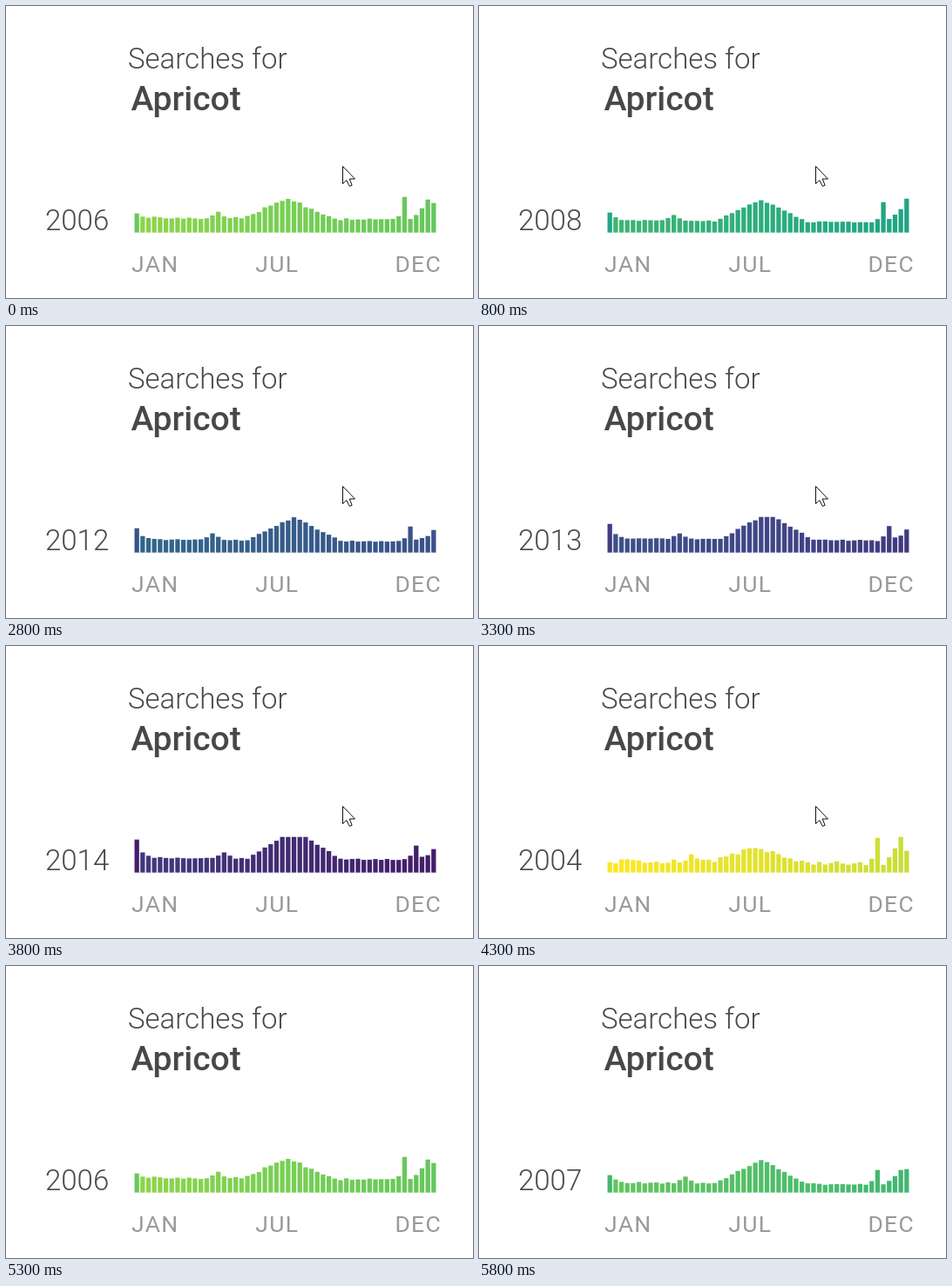
Animation of 536 by 336 pixels, one loop 6.1 s. Source, as an HTML page:

```html
<!DOCTYPE html>
<html lang="en">
<head>
<meta charset="utf-8">
<title>Seasonal searches</title>
<style>
  html, body { margin: 0; width: 100%; height: 100%; overflow: hidden; background: #fff; }
  svg { display: block; width: 536px; height: 336px; }
  text { font-family: Roboto, "Open Sans", sans-serif; }
  .light { font-size: 33px; font-weight: 300; fill: #4a4a4a; }
  .name { font-size: 39px; font-weight: 500; fill: #484848; }
  .month { font-size: 26.5px; letter-spacing: 1.3px; fill: #999; }
</style>
</head>
<body>
<svg viewBox="0 0 536 336">
  <text class="light" x="140" y="72">Searches for</text>
  <text class="name" x="143.5" y="120">Apricot</text>
  <text class="light" id="year" x="45" y="258"></text>
  <g id="bars"></g>
  <text class="month" x="144" y="306">JAN</text>
  <text class="month" x="286.3" y="306">JUL</text>
  <text class="month" x="446.4" y="306">DEC</text>
  <path id="cursor" d="M0 0V20L4.4 16L7.8 22.9L10.6 21.8L7.8 14.5H14Z"
        fill="#fff" stroke="#111"/>
</svg>
<script>
const LOOP = 6100, WEEKS = 52, BASE = 260.7, LEFT = 147.5, PITCH = 6.68, WIDTH = 5.3;
const FIRST = 2004, YEARS = 11, TALLEST = 41;

const ramp = ['#fde725', '#7ad151', '#22a884', '#2a788e', '#414487', '#440154']
  .map(hex => [1, 3, 5].map(i => parseInt(hex.slice(i, i + 2), 16)));

// Heights that shape a season: quiet weeks, New Year, summer, November sale, last two weeks.
const keys = {
  2005: [12, 12, 29, 40, 41, 25],
  2006: [16, 22, 39, 41, 38, 34],
  2007: [10.5, 20, 38, 26, 26, 27],
  2008: [13, 23, 38, 35, 27, 39],
  2010: [14.5, 18, 41, 31, 26, 41],
  2012: [14, 28, 41, 30, 19, 26],
  2014: [16, 38, 50, 31, 20, 27],
};

const lerp = (a, b, k) => a + (b - a) * k;

// Years without a key lie halfway between their neighbours.
function keyOf(year) {
  if (keys[year]) return keys[year];
  const next = keys[year + 1], prev = keys[year - 1] || next;
  return prev.map((v, i) => lerp(v, next[i], 0.5));
}

function easterWeek(year) {
  const d = (19 * (year % 19) + 24) % 30;
  const e = (2 * (year % 4) + 4 * (year % 7) + 6 * d + 5) % 7;
  return Math.floor((79 + d + e) / 7);
}

function noise(seed) {
  const v = Math.sin(seed * 12.9898) * 43758.5453;
  return v - Math.floor(v) - 0.5;
}

function height(year, week) {
  const [quiet, first, summer, sale, eve, last] = keyOf(year);
  const age = year - 2005;
  const peak = Math.floor(25.8 + 0.23 * age);
  const saleWeek = 46 + Math.round(age / 5);
  if (week === saleWeek) return sale;
  if (week === WEEKS - 1) return last;

  let h = quiet + 1.2 - week / 20;
  h += (first - h) * 0.3 ** week;
  h += Math.max(0, summer - quiet) * Math.max(0, 1 - Math.abs(week - peak) / 8);
  h += Math.max(0, 7 - 4 * Math.abs(week - easterWeek(year)));
  if (week === saleWeek - 1) h += 4;
  if (week > 47) h = lerp(quiet, eve, ((week - 47) / 3) ** 1.5);
  else if (week) h += noise(year * WEEKS + week) * Math.max(1.5, 4 - age);
  return Math.min(h, TALLEST);
}

function color(year, week) {
  // After the second season the opening week wears the closing colour.
  const k = week === 0 && year > 2005 ? 0.9 : week / WEEKS;
  const pos = (year - FIRST + k) * (ramp.length - 1) / (YEARS + 1);
  const i = Math.floor(pos);
  return `rgb(${ramp[i].map((v, c) => Math.round(lerp(v, ramp[i + 1][c], pos - i)))})`;
}

const $ = id => document.getElementById(id);
const bars = Array.from({ length: WEEKS }, (_, week) => {
  const bar = document.createElementNS('http://www.w3.org/2000/svg', 'rect');
  bar.setAttribute('x', LEFT + week * PITCH);
  bar.setAttribute('width', WIDTH);
  return $('bars').appendChild(bar);
});

let shown;
function showYear(year) {
  if (year === shown) return;
  shown = year;
  $('year').textContent = year;
  bars.forEach((bar, week) => {
    const h = height(year, week);
    bar.setAttribute('y', BASE - h);
    bar.setAttribute('height', h);
    bar.setAttribute('fill', color(year, week));
  });
}

// Start time and pointer tip; no tip means hidden.
const pointer = [[0, 386.5, 184.5], [4800, 401.5, 195.5], [4900, 430.5, 222.5],
  [5000, 469.5, 263.5], [5100]];

function draw(t) {
  const step = Math.floor((t + 200) / 500);
  showYear(FIRST + (2 + step) % YEARS);
  const [, x, y] = pointer.filter(p => p[0] <= t).pop();
  $('cursor').style.display = x ? '' : 'none';
  if (x) $('cursor').setAttribute('transform', `translate(${x} ${y})`);
}

const start = performance.now();
function tick(now) {
  draw(Math.max(0, now - start) % LOOP);
  requestAnimationFrame(tick);
}
draw(0);
requestAnimationFrame(tick);
</script>
</body>
</html>
```
